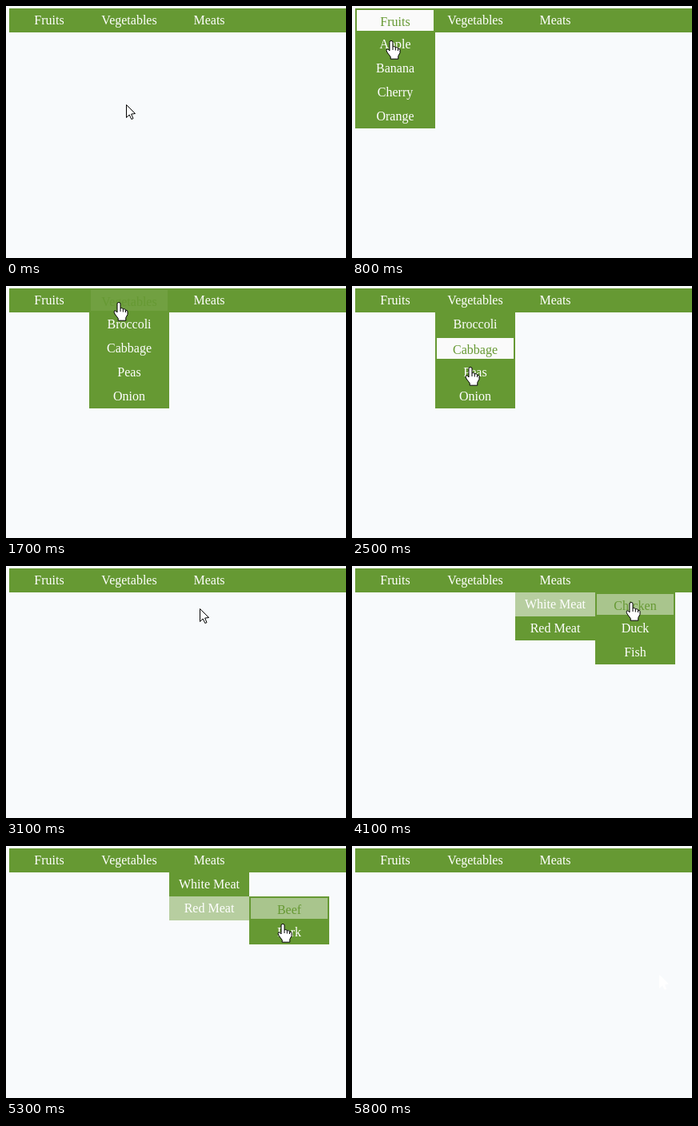
An HTML page with a canvas for the animation above (6400 ms loop, 425 by 315 pixels).

```html
<!DOCTYPE html>
<html lang="en">
<head>
<meta charset="utf-8">
<title>Dropdown menu</title>
<style>
  html, body { margin: 0; width: 100%; height: 100%; overflow: hidden; background: #f8fafc; }
  canvas { display: block; }
</style>
</head>
<body>
<canvas id="stage" width="425" height="315"></canvas>
<script>
const ctx = document.getElementById('stage').getContext('2d');
const PAGE = '#f8fafc', GREEN = '#669933', LIGHT = '#fafafa';
const W = 100, H = 30, STEP = 100, LOOP = 6400, LAST = 58;
const FADE = [0, 0.07, 0.45, 1];

// Menu tree, flattened into items with a place and a parent
const items = [];
function add(label, x, y, parent) {
  const item = { label, x, y, parent };
  items.push(item);
  return item;
}
function addColumn(labels, x, y, parent) {
  return labels.map((label, i) => add(label, x, y + i * H, parent));
}
const [fruits, vegetables, meats] =
  ['Fruits', 'Vegetables', 'Meats'].map((label, i) => add(label, 4 + i * W, 3, null));
addColumn(['Apple', 'Banana', 'Cherry', 'Orange'], 4, 33, fruits);
addColumn(['Broccoli', 'Cabbage', 'Peas', 'Onion'], 104, 33, vegetables);
const [white, red] = addColumn(['White Meat', 'Red Meat'], 204, 33, meats);
addColumn(['Chicken', 'Duck', 'Fish'], 304, 33, white);
addColumn(['Beef', 'Pork'], 304, 63, red);

// Pointer path: step, x, y
const path = [
  [0, 150, 123], [4, 62, 24], [7, 50, 28], [8, 49, 43], [14, 48, 138],
  [15, 95, 85], [16, 140, 24], [17, 141, 20], [19, 145, 27], [20, 148, 42],
  [27, 148, 125], [28, 150, 127], [29, 152, 136], [30, 212, 90], [31, 242, 53],
  [32, 245, 30], [34, 250, 24], [35, 252, 42], [37, 262, 48], [38, 292, 48],
  [39, 322, 47], [41, 349, 45], [42, 350, 56], [43, 350, 72], [45, 338, 84],
  [46, 301, 74], [47, 289, 70], [49, 286, 72], [50, 286, 72], [51, 322, 78],
  [54, 358, 106], [55, 364, 116], [56, 378, 140], [57, 384, 161], [58, 384, 161]
];

function pointerAt(step) {
  const i = Math.max(1, path.findIndex(p => p[0] >= step));
  const [s0, x0, y0] = path[i - 1], [s1, x1, y1] = path[i];
  const k = (step - s0) / (s1 - s0);
  return { x: Math.round(x0 + (x1 - x0) * k), y: Math.round(y0 + (y1 - y0) * k) };
}

function isOpen(item, hovered) {
  if (!item.parent) return true;
  for (let h = hovered; h; h = h.parent) if (h === item.parent) return true;
  return false;
}

function hit(p, hovered) {
  return items.find(m => isOpen(m, hovered) &&
    p.x >= m.x && p.x < m.x + W && p.y >= m.y && p.y < m.y + H) || null;
}

// Hover follows the pointer one step late; fades take three steps
function simulate() {
  const states = [];
  let hovered = null;
  let fades = items.map(() => ({ level: 0, alpha: 0 }));
  for (let step = 0; step <= LAST; step++) {
    if (step) hovered = hit(pointerAt(step - 1), hovered);
    fades = items.map((item, i) => {
      if (!isOpen(item, hovered)) return { level: 0, alpha: 0 };
      const { level, alpha } = fades[i];
      if (item === hovered) {
        const up = Math.min(3, level + 1);
        return { level: up, alpha: Math.max(alpha, FADE[up]) };
      }
      const down = Math.max(0, level - 1);
      return { level: down, alpha: Math.min(alpha, 1 - FADE[3 - down]) };
    });
    states.push({ hovered, fades, pointer: pointerAt(step) });
  }
  return states;
}
const states = simulate();

function drawItem(item, active, alpha) {
  const edge = active ? 2 : 0;
  ctx.fillStyle = GREEN;
  ctx.fillRect(item.x, item.y, W, H);
  ctx.globalAlpha = alpha;
  ctx.fillStyle = LIGHT;
  ctx.fillRect(item.x + edge, item.y + edge, W - 2 * edge, H - 2 * edge);
  ctx.globalAlpha = 1;
  ctx.fillStyle = active ? GREEN : '#fff';
  ctx.fillText(item.label, item.x + W / 2, item.y + 20 + edge);
}

const arrow = new Path2D('M.5 .5V16.5L4.2 13L6.8 18.5L9 17.6L6.6 12.1L11.5 11.5Z');
const hand = new Path2D(
  'M-2 13V2Q-2 .5 0 .5Q2 .5 2 2V8Q3.5 6.8 5.3 8.4V9Q7 8 8.5 9.6V10.4' +
  'Q11 9.8 11 12V15.5L8.8 19.5V23.2H-.8V20.5L-5 15Q-6.8 12 -5.2 10.8Q-3.8 10.4 -2 13Z');
const knuckles = new Path2D('M2 8V12M5.3 9V12.5M8.5 10.4V13');

function drawPointer({ x, y }, shape, ink) {
  ctx.save();
  ctx.translate(x, y);
  ctx.fillStyle = '#fff';
  ctx.strokeStyle = ink;
  ctx.fill(shape);
  ctx.stroke(shape);
  if (shape === hand) ctx.stroke(knuckles);
  ctx.restore();
}

function draw(step) {
  const { hovered, fades, pointer } = states[step];
  ctx.fillStyle = PAGE;
  ctx.fillRect(0, 0, 425, 315);
  ctx.fillStyle = GREEN;
  ctx.fillRect(4, 3, 421, H);
  ctx.font = '16px "Liberation Serif", "Times New Roman", serif';
  ctx.textAlign = 'center';
  ctx.lineWidth = 1;
  ctx.lineJoin = 'round';
  items.forEach((item, i) => {
    if (isOpen(item, hovered)) drawItem(item, item === hovered, fades[i].alpha);
  });
  drawPointer(pointer, hovered ? hand : arrow, step === LAST ? '#fff' : '#000');
}

const start = performance.now();
function tick() {
  const t = (performance.now() - start) % LOOP;
  draw(Math.min(LAST, Math.floor(t / STEP)));
  requestAnimationFrame(tick);
}
tick();
</script>
</body>
</html>
```
